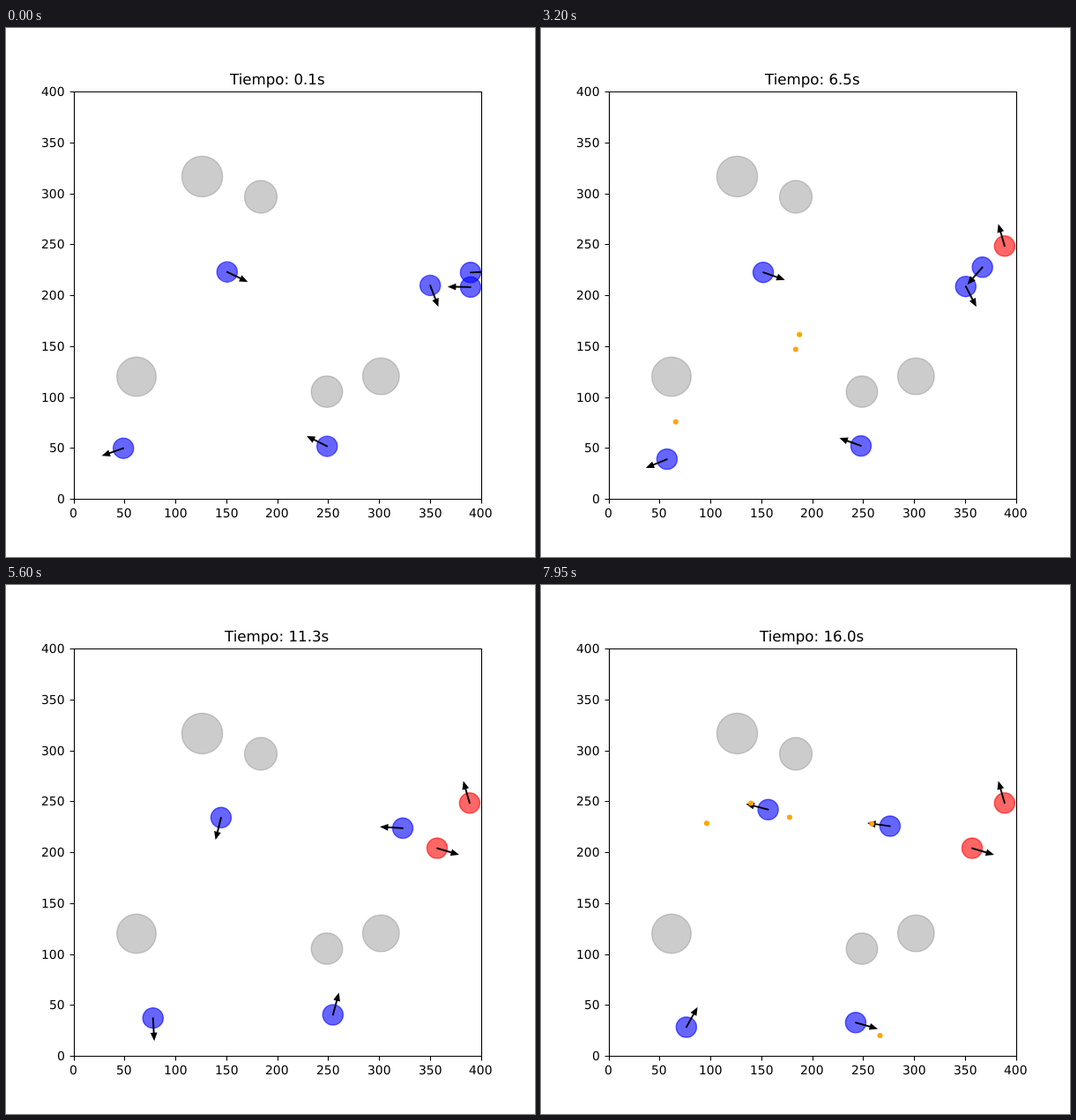
Write an HTML page with a canvas that moves like this. It is 600x600 px and loops after 8 s.

```html
<!DOCTYPE html>
<html lang="es">
<head>
<meta charset="utf-8">
<style>
  html, body { margin: 0; width: 100%; height: 100%; overflow: hidden; background: #fff; }
  canvas { display: block; }
</style>
</head>
<body>
<canvas id="stage" width="600" height="600"></canvas>
<script>
const ctx = document.getElementById('stage').getContext('2d');

// World: 400 x 400 units, y upwards
const WORLD = 400, RADIUS = 10, HIT = 9, HEALTH = 4, RANGE = 150, COOLDOWN = 9;
const SPEED = 10, BULLET_SPEED = 100, DT = 0.1;
const FRAMES = 160, FRAME_MS = 50;
const UNIT = 1.155, LEFT = 76.5, BOTTOM = 534, SIZE = WORLD * UNIT, LINE = 1.39;
const px = x => LEFT + x * UNIT, py = y => BOTTOM - y * UNIT;

const obstacles = [
  [126.4, 316.5, 20], [184, 296.5, 16], [61.9, 119.9, 19.3], [248.9, 105.2, 15.4], [302, 120.3, 18]
].map(([x, y, r]) => ({ x, y, r }));

const circling = () => 1, zigzag = t => 2 * Math.sin(t), spiral = () => 0.5;

// Robots start 100 units apart; "fires" lists single shots in tenths of a second
const robots = [
  { y: 50, heading: 3.463, turn: zigzag, autoFire: true },
  { y: 223.2, heading: -0.548, turn: circling, fires: [14, 33, 48, 57, 122, 159] },
  { y: 51.1, heading: 2.573, turn: circling, fires: [120, 158] },
  { y: 210.5, heading: 4.976, turn: circling, fires: [48] },
  { y: 207.9, heading: 0, chases: true, autoFire: true },
  { y: 222.2, heading: 0, turn: spiral }
].map((robot, i) => ({ x: 50 + 100 * i, hits: 0, ready: 0, fires: [], ...robot }));

const distance = (a, b) => Math.hypot(a.x - b.x, a.y - b.y);
const alive = robot => robot.hits < HEALTH;
const clamp = v => Math.max(RADIUS, Math.min(WORLD - RADIUS, v));

function move(body, length) {
  body.x += length * Math.cos(body.heading);
  body.y += length * Math.sin(body.heading);
}

function nearestTo(robot) {
  return robots.filter(r => r !== robot && alive(r))
    .reduce((a, b) => distance(robot, b) < distance(robot, a) ? b : a);
}

function stepRobot(robot, step, bullets) {
  const target = nearestTo(robot), gap = distance(robot, target);
  if (robot.chases) robot.heading = Math.atan2(target.y - robot.y, target.x - robot.x);
  else robot.heading += robot.turn(step * DT) * DT;
  const auto = robot.autoFire && gap < RANGE && step >= robot.ready;
  if (auto || robot.fires.includes(step)) {
    bullets.push({ x: robot.x, y: robot.y, heading: robot.heading, owner: robot });
    robot.ready = step + COOLDOWN;
  }
  move(robot, SPEED * DT);
  robot.x = clamp(robot.x);
  robot.y = clamp(robot.y);
}

function survives(bullet) {
  move(bullet, BULLET_SPEED * DT);
  const struck = robots.find(r => r !== bullet.owner && alive(r) && distance(r, bullet) < HIT);
  if (struck) struck.hits++;
  const inside = Math.min(bullet.x, bullet.y) >= 0 && Math.max(bullet.x, bullet.y) <= WORLD;
  return inside && !struck && !obstacles.some(o => distance(o, bullet) < o.r);
}

function simulate() {
  const frames = [];
  let bullets = [];
  for (let step = 1; step <= FRAMES; step++) {
    robots.filter(alive).forEach(robot => stepRobot(robot, step, bullets));
    bullets = bullets.filter(survives);
    frames.push({
      time: step * DT,
      robots: robots.map(r => ({ x: r.x, y: r.y, heading: r.heading, alive: alive(r) })),
      bullets: bullets.map(({ x, y }) => ({ x, y }))
    });
  }
  return frames;
}

function disc({ x, y }, r, color, alpha = 1) {
  ctx.globalAlpha = alpha;
  ctx.fillStyle = ctx.strokeStyle = color;
  ctx.lineWidth = LINE;
  ctx.beginPath();
  ctx.arc(px(x), py(y), r * UNIT, 0, 2 * Math.PI);
  ctx.fill();
  ctx.stroke();
  ctx.globalAlpha = 1;
}

function arrow({ x, y, heading }) {
  const shaft = 15 * UNIT, tip = 21 * UNIT, half = 2.5 * UNIT;
  ctx.save();
  ctx.translate(px(x), py(y));
  ctx.rotate(-heading);
  ctx.fillStyle = ctx.strokeStyle = '#000';
  ctx.lineWidth = 1.9;
  ctx.beginPath();
  ctx.moveTo(-LINE / 2, 0);
  ctx.lineTo(shaft, 0);
  ctx.stroke();
  ctx.lineWidth = LINE;
  ctx.beginPath();
  ctx.moveTo(shaft, -half);
  ctx.lineTo(tip, 0);
  ctx.lineTo(shaft, half);
  ctx.closePath();
  ctx.fill();
  ctx.stroke();
  ctx.restore();
}

// Text starts on a whole pixel; align is the share of its width left of x
function text(str, x, y, size, align) {
  ctx.font = `${size}px "DejaVu Sans", sans-serif`;
  ctx.textRendering = 'geometricPrecision';
  ctx.fillText(str, Math.round(x - align * ctx.measureText(str).width), Math.round(y));
}

function drawAxes(time) {
  const snap = v => Math.floor(v + 0.5) + 0.5;
  ctx.fillStyle = ctx.strokeStyle = '#000';
  ctx.lineWidth = 1.11;
  ctx.beginPath();
  ctx.rect(snap(LEFT), snap(BOTTOM - SIZE), SIZE, SIZE);
  for (let v = 0; v <= WORLD; v += 50) {
    const x = px(v), y = py(v);
    ctx.moveTo(snap(x), BOTTOM + 0.5);
    ctx.lineTo(snap(x), BOTTOM + 5.4);
    ctx.moveTo(snap(LEFT), snap(y));
    ctx.lineTo(snap(LEFT) - 4.9, snap(y));
    text(v, x, 555, 13.89, 0.5);
    text(v, 66.8, y + 5, 13.89, 1);
  }
  ctx.stroke();
  text(`Tiempo: ${time.toFixed(1)}s`, LEFT + SIZE / 2, 64, 16.67, 0.5);
}

function draw(frame) {
  ctx.fillStyle = '#fff';
  ctx.fillRect(0, 0, 600, 600);
  ctx.save();
  ctx.beginPath();
  ctx.rect(LEFT, BOTTOM - SIZE, SIZE + 0.5, SIZE);
  ctx.clip();
  for (const o of obstacles) disc(o, o.r, '#808080', 0.4);
  for (const robot of frame.robots) {
    disc(robot, RADIUS, robot.alive ? '#00f' : '#f00', 0.6);
    arrow(robot);
  }
  for (const bullet of frame.bullets) disc(bullet, 2, '#ffa500');
  ctx.restore();
  drawAxes(frame.time);
}

const frames = simulate();
const began = performance.now();
function tick() {
  draw(frames[Math.floor((performance.now() - began) / FRAME_MS) % FRAMES]);
  requestAnimationFrame(tick);
}
tick();
</script>
</body>
</html>
```
